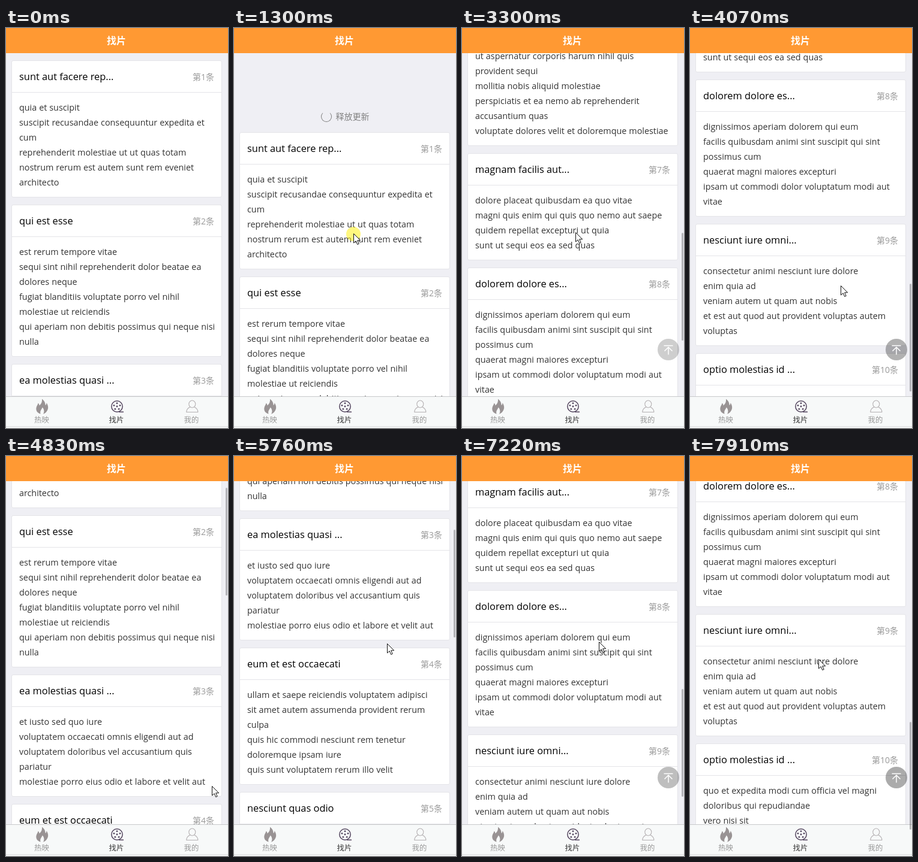
An HTML page for the animation above (7.99 s loop, 370 by 668 pixels).

```html
<!DOCTYPE html>
<html lang="zh">
<head>
<meta charset="utf-8">
<title>找片</title>
<style>
  html, body { margin: 0; width: 100%; height: 100%; overflow: hidden; }
  body { position: relative; background: #efeff4; color: #333; font-family: "Open Sans", "Noto Sans CJK SC", "Noto Sans CJK", sans-serif; }
  #stage { position: absolute; left: 0; top: 0; width: 370px; height: 668px; overflow: hidden; background: #efeff4; }
  #stage > * { position: absolute; }
  header { left: 0; top: 0; width: 370px; height: 42px; background: #f93; color: #fff; font: bold 16px/40px "Noto Sans CJK SC", "Noto Sans CJK", sans-serif; text-align: center; text-indent: -2px; }
  #view { left: 0; top: 42px; width: 370px; height: 573px; overflow: hidden; }
  #list { position: absolute; left: 9px; top: 12px; width: 351px; }
  .card { box-sizing: border-box; margin-bottom: 12px; border: 1px solid #e4e4e8; border-radius: 3px; background: #fff; }
  .card h2 { display: flex; justify-content: space-between; margin: 0; padding: 0 12px; height: 52px; border-bottom: 1px solid #e4e4e8; font-size: 16.4px; font-weight: 400; line-height: 52px; color: #000; }
  .card h2 span { font-size: 14px; line-height: 54px; color: #999; }
  .card p { margin: 0; padding: 12px; font-size: 14.35px; line-height: 25px; word-spacing: .25px; white-space: pre; }
  #hint { position: absolute; left: 0; top: -30px; width: 370px; height: 32px; display: flex; justify-content: center; align-items: center; gap: 7px; font-size: 14px; line-height: 32px; color: #808080; }
  #ring { box-sizing: border-box; width: 18px; height: 18px; border: 1px solid #808080; border-bottom-color: transparent; border-radius: 50%; }
  #top { left: 326px; top: 519px; }
  footer { box-sizing: border-box; left: 0; top: 615px; width: 370px; height: 53px; border-top: 1px solid #c8c9cb; background: #f7f9f9; }
  footer::after { content: ""; position: absolute; left: 0; top: 49px; width: 370px; height: 1px; background: #dcdcde; }
  footer span { position: absolute; top: 30px; width: 60px; text-align: center; font-size: 12.4px; line-height: 18px; color: #999; }
  footer svg { position: absolute; left: 0; top: 0; }
  #thumb { left: 366px; top: 0; width: 3px; height: 180px; border-radius: 2px; background: rgba(0, 0, 0, .25); }
  #cursor { left: 0; top: 0; overflow: visible; }
</style>
</head>
<body>
<div id="stage">
  <div id="view">
    <div id="hint"><i id="ring"></i><span id="label"></span></div>
    <div id="list"></div>
  </div>
  <header>找片</header>
  <svg id="top" width="36" height="36">
    <circle id="disc" cx="18" cy="18" r="18"/>
    <path d="M10.5 11.5H25.5M18 26.5V14.5M11.5 20.5L18 14L24.5 20.5" fill="none" stroke="#fff" stroke-width="1.5"/>
  </svg>
  <footer>
    <svg width="370" height="52" fill="none">
      <path d="M60 3.5C66 8 65 12 66 14C67 13 67.5 11.5 67.5 10C71 15 71 20 68 24C66.5 26.5 64 28 62 28.5C64.5 25 63.5 20 60.5 17.5C60.5 20.5 56 22 57.5 28.5C52 27 49.5 22.5 50.5 18C51 15 53 13.5 53.5 10.5C55 11.5 55.5 13 55.5 14.5C59 12 60.5 8 60 3.5Z" fill="#999394"/>
      <g stroke="#54465f" stroke-width="1.5">
        <circle cx="185" cy="16" r="9.2"/>
        <path d="M188 25.2H196"/>
      </g>
      <g id="holes" fill="#54465f"></g>
      <g stroke="#b5b1b3" stroke-width="1.1">
        <ellipse cx="310.3" cy="12" rx="5.5" ry="6"/>
        <path d="M306.8 17C303.3 18.5 300.8 21 300.8 25.5H319.8C319.8 21 317.3 18.5 313.8 17"/>
      </g>
    </svg>
    <span style="left:29.5px">热映</span>
    <span style="left:154px;color:#333">找片</span>
    <span style="left:279px">我的</span>
  </footer>
  <div id="thumb"></div>
  <svg id="cursor" width="14" height="20">
    <circle id="press" r="12" cy="1" fill="#fff000" fill-opacity=".5"/>
    <path d="M.5 .5V16L4.2 12.7L6.7 18.5L9.2 17.4L6.7 11.8H11.7Z" fill="#fff" stroke="#111"/>
  </svg>
</div>
<script>
const LOOP = 7990, LEAD = 142, STEP = 76.8, LAST = 101;
const $ = id => document.getElementById(id);

const posts = [
  ["sunt aut facere rep...", "quia et suscipit\nsuscipit recusandae consequuntur expedita et\ncum\nreprehenderit molestiae ut ut quas totam\nnostrum rerum est autem sunt rem eveniet\narchitecto"],
  ["qui est esse", "est rerum tempore vitae\nsequi sint nihil reprehenderit dolor beatae ea\ndolores neque\nfugiat blanditiis voluptate porro vel nihil\nmolestiae ut reiciendis\nqui aperiam non debitis possimus qui neque nisi\nnulla"],
  ["ea molestias quasi ...", "et iusto sed quo iure\nvoluptatem occaecati omnis eligendi aut ad\nvoluptatem doloribus vel accusantium quis\npariatur\nmolestiae porro eius odio et labore et velit aut"],
  ["eum et est occaecati", "ullam et saepe reiciendis voluptatem adipisci\nsit amet autem assumenda provident rerum\nculpa\nquis hic commodi nesciunt rem tenetur\ndoloremque ipsam iure\nquis sunt voluptatem rerum illo velit"],
  ["nesciunt quas odio", "repudiandae veniam quaerat sunt sed\nalias aut fugiat sit autem sed est\nvoluptatem omnis possimus esse voluptatibus\nquis\nest aut tenetur dolor neque"],
  ["dolorem eum mag...", "ut aspernatur corporis harum nihil quis\nprovident sequi\nmollitia nobis aliquid molestiae\nperspiciatis et ea nemo ab reprehenderit\naccusantium quas\nvoluptate dolores velit et doloremque molestiae"],
  ["magnam facilis aut...", "dolore placeat quibusdam ea quo vitae\nmagni quis enim qui quis quo nemo aut saepe\nquidem repellat excepturi ut quia\nsunt ut sequi eos ea sed quas"],
  ["dolorem dolore es...", "dignissimos aperiam dolorem qui eum\nfacilis quibusdam animi sint suscipit qui sint\npossimus cum\nquaerat magni maiores excepturi\nipsam ut commodi dolor voluptatum modi aut\nvitae"],
  ["nesciunt iure omni...", "consectetur animi nesciunt iure dolore\nenim quia ad\nveniam autem ut quam aut nobis\net est aut quod aut provident voluptas autem\nvoluptas"],
  ["optio molestias id ...", "quo et expedita modi cum officia vel magni\ndoloribus qui repudiandae\nvero nisi sit\nquos veniam quod sed accusamus veritatis\nerror"]
];
$("list").innerHTML = posts.map(([title, text], i) =>
  `<div class="card"><h2>${title}<span>第${i + 1}条</span></h2><p>${text}</p></div>`).join("");

const hole = (x, y) => `<circle cx="${x}" cy="${y}" r="1.4"/>`;
$("holes").innerHTML = hole(185, 16) + [0, 1, 2, 3, 4].map(i => {
  const a = (i * 0.4 - 0.5) * Math.PI;
  return hole(185 + 5.3 * Math.cos(a), 16 + 5.3 * Math.sin(a));
}).join("");

// Each row: step, value(s)
const scrollKeys = [[25, 0], [26, 20], [30, 421], [34, 660], [37, 820], [41, 1266], [46, 1500], [50, 1580], [57, 1580],
  [61, 196], [62, 4], [63, 0], [65, 0], [69, 240], [76, 620], [83, 1072], [91, 1420], [101, 1643]];
const pullKeys = [[10, 0], [11, 38], [13, 95], [15, 120], [18, 120], [20, 80], [22, 80], [25, 0]];
const cursorKeys = [[0, 282, 650], [4, 262, 470], [10, 222, 287], [11, 199, 261], [15, 199, 343], [19, 199, 343], [26, 200, 230],
  [30, 200, 196], [36, 194, 300], [41, 189, 341], [49, 205, 370], [55, 343, 551], [61, 343, 551], [69, 260, 330],
  [83, 243, 272], [92, 228, 310], [101, 214, 339]];

function at(keys, n) {
  const i = keys.findIndex(k => k[0] >= n);
  if (i < 0) return keys[keys.length - 1].slice(1);
  if (i === 0) return keys[0].slice(1);
  const a = keys[i - 1], b = keys[i], u = (n - a[0]) / (b[0] - a[0]);
  return a.slice(1).map((v, j) => Math.round(v + (b[j + 1] - v) * u));
}

function draw(n) {
  const [scroll] = at(scrollKeys, n), [pull] = at(pullKeys, n), [x, y] = at(cursorKeys, n);
  const loading = n > 18;
  $("list").style.transform = `translateY(${pull - scroll}px)`;
  $("hint").style.transform = `translateY(${pull}px)`;
  $("hint").style.visibility = pull ? "visible" : "hidden";
  $("ring").style.transform = `rotate(${loading ? (n - 18) * 46 + 180 : pull * 4.5}deg)`;
  $("label").textContent = loading ? "加载中 ..." : pull < 80 ? "下拉刷新" : "释放更新";
  $("thumb").style.visibility = n >= 26 ? "visible" : "hidden";
  $("thumb").style.transform = `translateY(${Math.round(scroll * 0.27)}px)`;
  const shade = Math.max(0, (scroll - 730) * 0.00036);
  $("disc").setAttribute("fill-opacity", shade);
  $("top").style.opacity = Math.min(1, shade * 9);
  $("cursor").style.visibility = n < 0 ? "hidden" : "visible";
  $("cursor").style.transform = `translate(${x}px, ${y}px)`;
  $("press").style.display = (n >= 11 && n <= 18) || n === 56 || n === 57 ? "" : "none";
}

const start = performance.now();
function tick() {
  const t = (performance.now() - start) % LOOP;
  draw(Math.min(LAST, Math.floor((t - LEAD) / STEP)));
  requestAnimationFrame(tick);
}
tick();
</script>
</body>
</html>
```
